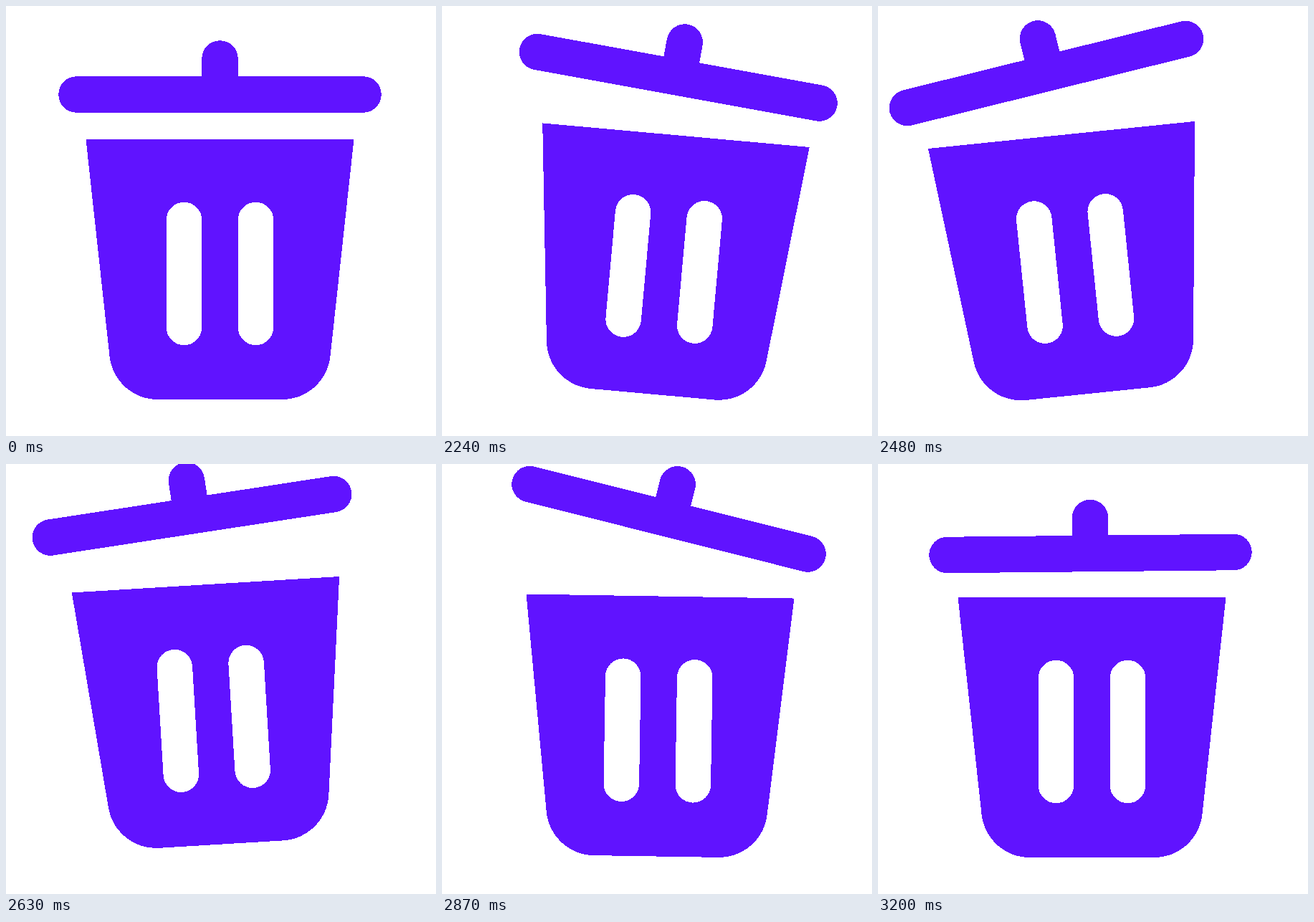
Animation of 600 by 600 pixels, one loop 3.26 s. Source, as an HTML page:

```html
<!DOCTYPE html>
<html>
<head>
<meta charset="utf-8">
<style>
html, body { margin: 0; width: 100%; height: 100%; overflow: hidden; background: #fff; }
svg { display: block; width: 100%; height: 100%; }
</style>
</head>
<body>
<svg viewBox="0 0 600 600" shape-rendering="crispEdges" fill="#6013ff" stroke-linecap="round">
  <!-- origin: middle of the bottom edge -->
  <g id="body">
    <path d="M-187-363H187L154-60.5A67.5 67.5 0 0 1 86.5 0H-86.5A67.5 67.5 0 0 1-154-60.5Z"/>
    <path d="M-50-250.5v150M50-250.5v150" stroke="#fff" stroke-width="49.5"/>
  </g>
  <!-- origin: middle of the bar -->
  <path id="lid" d="M-200 0H200M0-50V0" stroke="#6013ff" stroke-width="50.5"/>
</svg>
<script>
const LOOP = 3260, REST = 2000, STEP = 30, LAST = 40;

// Each channel is a list of [step, value] keys.
const body = {
  x: [[0, 0], [8, -4.6], [16, -5.5], [21, 1.8], [26, .5], [29, .2], [34, 0]],
  y: [[0, 0], [8, -7.25], [9.5, -8], [13, -4], [16, -7.9], [21, -18.4], [26.5, -2.4], [29, -1.5], [34, 0]],
  turn: [[0, 0], [8, 5.15], [10, 6], [16, -5.85], [17, -6.3], [21, -3.45], [26.5, 1.6], [29, .92], [34, 0]]
};
const lid = {
  x: [[0, 0], [8, 31.25], [10, 38], [16, -63.5], [17, -67], [21, -39], [28, 18.5], [29, 18], [35, -14], [40, -2]],
  y: [[0, 0], [8, -23.75], [12.5, -43.5], [16, -29.5], [21, -51.2], [25, -56], [29, -46.7], [36, -9.5], [40, 1.5]],
  turn: [[0, 0], [8, 10.3], [10, 12.3], [16, -13.9], [17, -14.5], [21, -8.7], [28, 14.5], [29, 14.1], [35, -4], [40, -.57]]
};

const rate = (a, b) => (b[1] - a[1]) / (b[0] - a[0]);

// Flat at extremes and ends, smooth elsewhere.
function slope(keys, i) {
  if (!i || i === keys.length - 1) return 0;
  const a = rate(keys[i - 1], keys[i]), b = rate(keys[i], keys[i + 1]);
  return a * b > 0 ? 2 * a * b / (a + b) : 0;
}

function sample(keys, n) {
  const j = keys.findIndex(k => k[0] > n);
  if (j < 0) return keys[keys.length - 1][1];
  const [t0, v0] = keys[j - 1], [t1, v1] = keys[j];
  const d = t1 - t0, s = (n - t0) / d, r = 1 - s;
  return v0 + (v1 - v0) * s * s * (3 - 2 * s)
    + d * s * r * (r * slope(keys, j - 1) - s * slope(keys, j));
}

function place(id, part, x, y, n) {
  document.getElementById(id).setAttribute("transform",
    `translate(${x + sample(part.x, n)} ${y + sample(part.y, n)}) rotate(${sample(part.turn, n)})`);
}

function draw() {
  const t = performance.now() % LOOP;
  const n = Math.min(LAST, Math.max(0, Math.floor((t - REST) / STEP)));
  place("body", body, 298.5, 549, n);
  place("lid", lid, 298.5, 123.5, n);
  requestAnimationFrame(draw);
}
draw();
</script>
</body>
</html>
```
